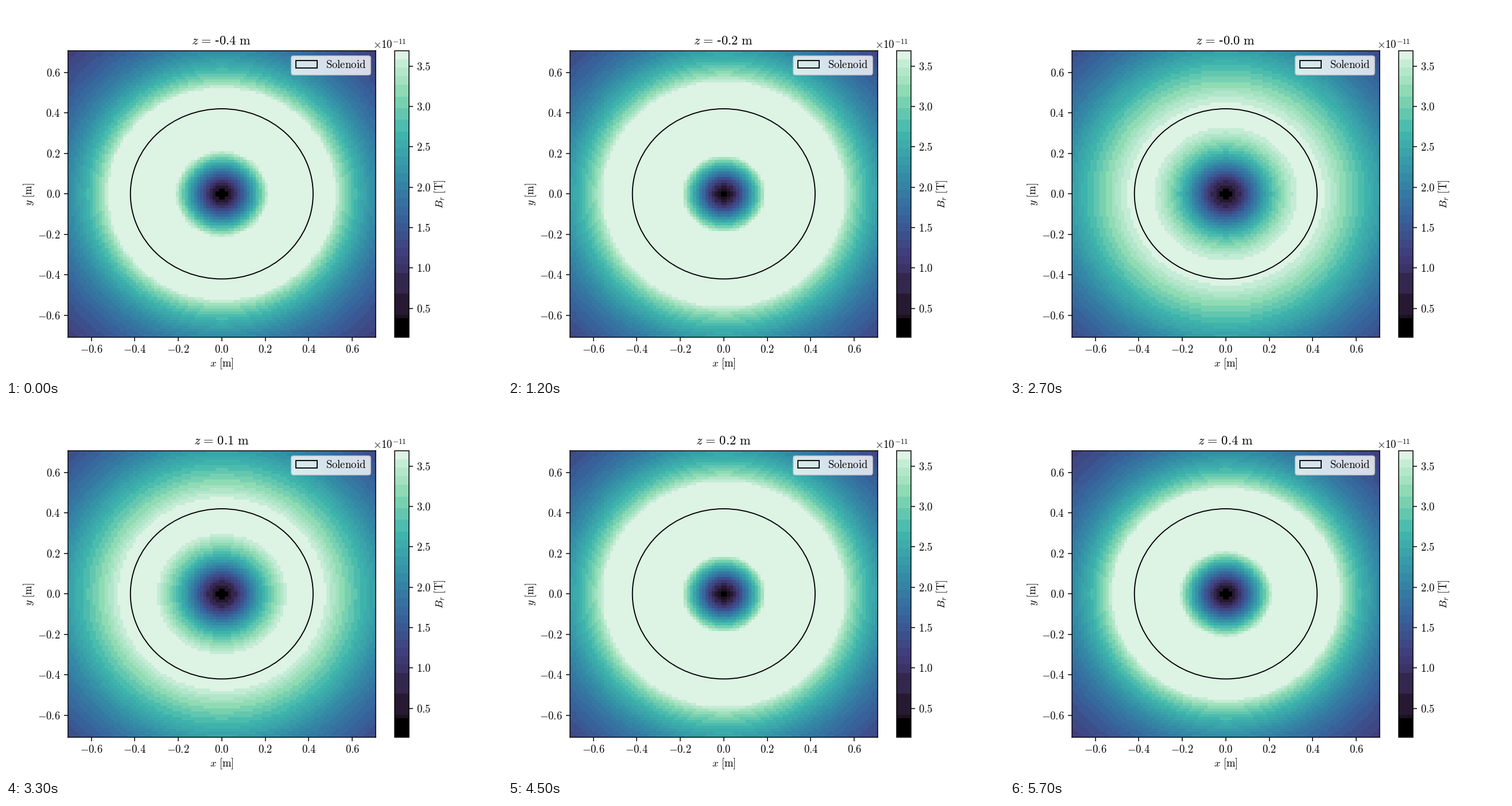
Recreate the animation shown at these times as a matplotlib script. Size 864 by 648 pixels, loop 6 s.

```python
import numpy as np
import matplotlib.pyplot as plt
from matplotlib.animation import FuncAnimation
from matplotlib.colors import BoundaryNorm, LinearSegmentedColormap, ListedColormap
from matplotlib.patches import Circle

W, H, DPI = 864, 648, 135
FRAMES, INTERVAL = 20, 300

plt.rcParams.update({
    "font.family": "Liberation Serif",
    "mathtext.fontset": "cm",
})

COIL = 0.362      # effective radius of each pole
OFFSET = 0.305    # height of the poles above and below the centre
V_MIN, V_MAX = 0.145, 3.692
HALF, CELLS = 0.7, 100

axis = np.linspace(-HALF, HALF, CELLS)
radius = np.hypot(*np.meshgrid(axis, axis))
heights = np.linspace(-0.4, 0.4, FRAMES)
cosines = np.cos((np.arange(64) + 0.5) * np.pi / 64)


def pole(dz):
    """Radial field of one end of a coil, averaged around its rim."""
    base = COIL**2 + radius**2 + dz**2
    return sum(c / np.sqrt(base - 2 * COIL * radius * c)
               for c in cosines) / len(cosines)


def raw_field(z):
    return pole(z - OFFSET) + pole(z + OFFSET)


GAIN = V_MAX / raw_field(heights[FRAMES // 2]).max()


def radial_field(z):
    return GAIN * raw_field(z)


def title(z):
    # A true hyphen, since mathtext turns "-" into a minus sign
    number = f"{z:.1f}".replace("-", "\u2010")
    return rf"$z\hspace{{0.13}}=\hspace{{0.13}}\mathrm{{{number}\ m}}$"


def banded_colors():
    ramp = LinearSegmentedColormap.from_list("deep_sea", [
        "#0b0405", "#2e1e3c", "#413d7b", "#37659e",
        "#348fa7", "#40b7ad", "#8bdab2", "#def5e5"])
    # Wide bands in the dark, fine ones in the blues and near white
    edges = np.r_[V_MIN, 0.375, 0.42, 0.68,
                  np.linspace(0.94, 2.69, 18),
                  np.linspace(2.69, 3.27, 5)[1:],
                  np.linspace(3.27, V_MAX, 5)[1:]]
    mids = (edges[:-1] + edges[1:]) / 2
    colors = ramp((mids - V_MIN) / (V_MAX - V_MIN))
    colors[0, :3] = 0
    colors[-1, :3] = 0.87, 0.953, 0.898
    return ListedColormap(colors), BoundaryNorm(edges, len(mids))


def label(x, y, text, size=10, **kw):
    return fig.text(x / W, 1 - y / H, text, fontsize=size,
                    va="baseline", rotation_mode="anchor", **kw)


def tick_text(v, _=None):
    return f"${v:.1f}$"


fig, ax = plt.subplots(figsize=(W / DPI, H / DPI), dpi=DPI)
cmap, norm = banded_colors()
edge = HALF + HALF / (CELLS - 1)
image = ax.imshow(radial_field(heights[0]), cmap=cmap, norm=norm,
                  origin="lower", extent=(-edge, edge, -edge, edge),
                  interpolation="nearest", aspect="auto")

ring = Circle((0, 0), 0.42, fill=False, ec="black", lw=1,
              label=r"$\mathrm{Solenoid}$")
ax.add_patch(ring)
ax.legend(handles=[ring], loc="upper right", borderaxespad=0.47)

ticks = np.arange(-3, 4) * 0.2
ax.set_xticks(ticks)
ax.set_yticks(ticks)
ax.xaxis.set_major_formatter(tick_text)
ax.yaxis.set_major_formatter(tick_text)

bar = fig.colorbar(image, ax=ax, spacing="proportional",
                   ticks=np.arange(1, 8) * 0.5, format=tick_text)
bar.minorticks_off()

heading = label(375.5, 67, title(heights[0]), 12, ha="center")
label(375.8, 628, r"$x\ \mathrm{[m]}$", ha="center")
label(45, 327.5, r"$y\ \mathrm{[m]}$", ha="center", rotation=90)
label(761, 327.5, r"$B_r\ \mathrm{[T]}$", ha="center", rotation=90)
label(639, 74, r"$\times 10^{-11}$", ha="left")


def update(i):
    image.set_data(radial_field(heights[i]))
    heading.set_text(title(heights[i]))
    return image, heading


anim = FuncAnimation(fig, update, frames=FRAMES, interval=INTERVAL,
                     repeat=True, repeat_delay=0, blit=False)
plt.show()
```
